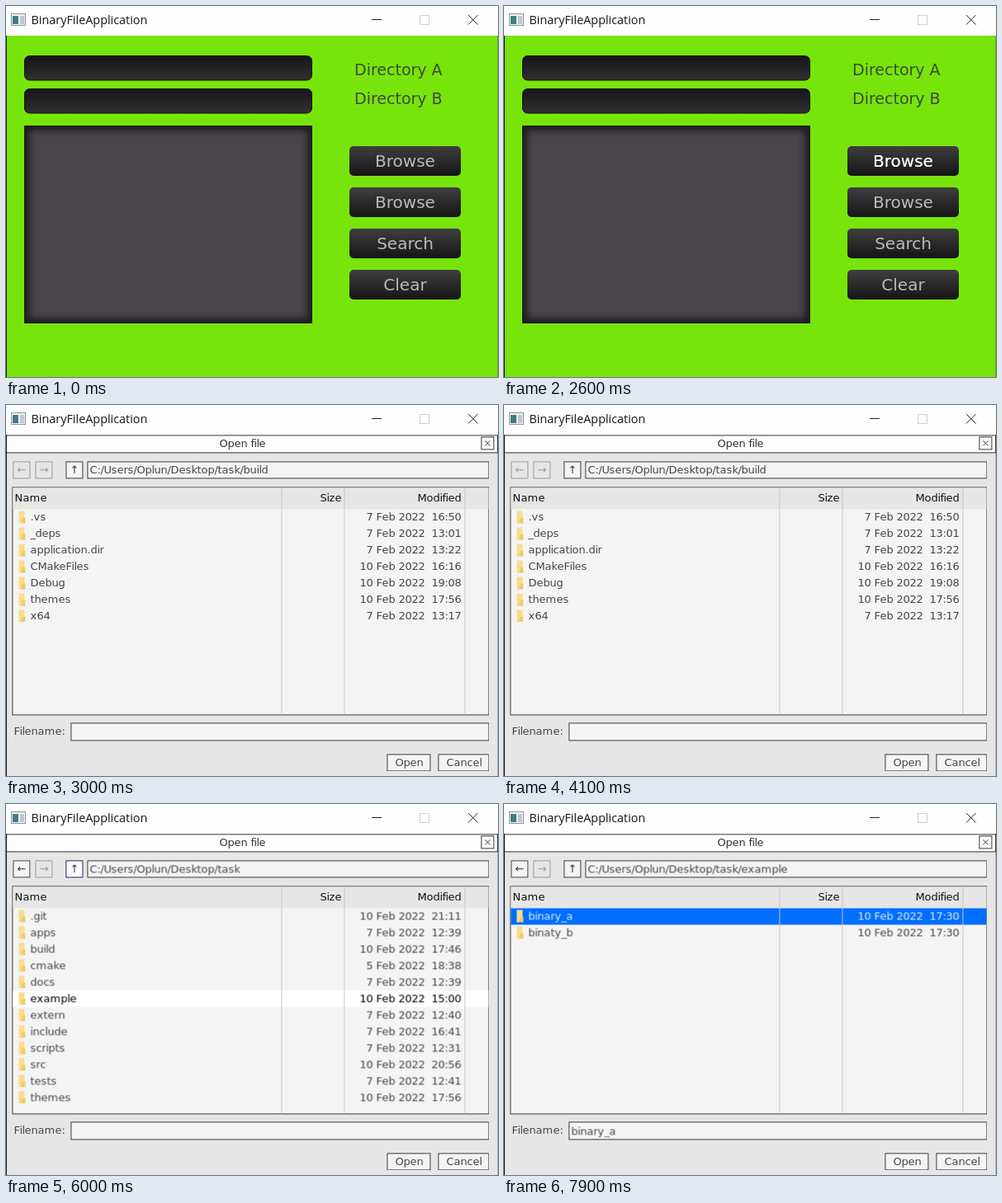
Animation of 596 by 450 pixels, one loop 8000 ms. Source, as an HTML page:

```html
<!DOCTYPE html>
<html lang="en">
<head>
<meta charset="utf-8">
<title>BinaryFileApplication</title>
<style>
html, body { margin: 0; width: 100%; height: 100%; overflow: hidden; background: #fff; }
svg { display: block; }
text { font-family: "DejaVu Sans", sans-serif; white-space: pre; }
.caption { font-family: "Open Sans", "Noto Sans", sans-serif; }
</style>
</head>
<body>
<svg id="stage" width="596" height="450" viewBox="0 0 596 450">
  <defs>
    <linearGradient id="button" x2="0" y2="1">
      <stop offset="0" stop-color="#3f3e40"/><stop offset="1" stop-color="#151516"/>
    </linearGradient>
    <linearGradient id="field" x2="0" y2="1">
      <stop offset="0" stop-color="#161617"/><stop offset="1" stop-color="#302f31"/>
    </linearGradient>
    <filter id="soft"><feGaussianBlur stdDeviation="4"/></filter>
  </defs>
</svg>
<script>
const LOOP = 8000;
const INK = '#464646', LINE = '#3a3a3a', PAPER = '#f4f4f4', PANEL = '#e6e6e6';
const stage = document.getElementById('stage');
const ruler = document.createElement('canvas').getContext('2d');
ruler.font = '1000px "DejaVu Sans", sans-serif';

function add(parent, tag, attrs = {}, content) {
  const el = document.createElementNS('http://www.w3.org/2000/svg', tag);
  for (const key in attrs) el.setAttribute(key, attrs[key]);
  if (content !== undefined) el.textContent = content;
  parent.appendChild(el);
  return el;
}
const group = (parent, attrs) => add(parent, 'g', attrs);
const fillBox = (parent, x, y, width, height, fill) =>
  add(parent, 'rect', { x, y, width, height, fill });
const frameBox = (parent, x, y, width, height, stroke = LINE, fill = PAPER) =>
  add(parent, 'rect', { x: x + .5, y: y + .5, width: width - 1, height: height - 1, stroke, fill });
const path = (parent, d, stroke, fill = 'none') => add(parent, 'path', { d, stroke, fill });

// Small text advances by whole pixels, like hinted glyphs.
const advance = char => Math.floor(ruler.measureText(char).width * .013 + .35);

function label(parent, content, x, y, fill = INK, align = 0) {
  const widths = [...content].map(advance);
  let pen = Math.round(x - align * widths.reduce((a, b) => a + b, 0));
  const xs = widths.map(w => (pen += w) - w);
  return add(parent, 'text', { x: xs.join(' '), y, fill, 'font-size': 13 }, content);
}

// steps: [time, opacity] pairs, each held until the next one.
function schedule(el, steps) {
  const frames = steps.map(([time, opacity]) => ({ offset: time / LOOP, opacity, easing: 'steps(1, end)' }));
  frames.push({ offset: 1, opacity: steps[steps.length - 1][1] });
  el.animate(frames, { duration: LOOP, iterations: Infinity });
}
function during(el, from, to = LOOP) {
  const steps = [[0, 0], [from, 1]];
  if (to < LOOP) steps.push([to, 0]);
  schedule(el, steps);
  return el;
}

function drawCaption() {
  fillBox(stage, 0, 0, 596, 36, '#fefefe');
  frameBox(stage, 6, 9, 18, 15, '#8d9499', '#f2f3f3');
  fillBox(stage, 8, 12, 7, 10, '#3d7f83');
  fillBox(stage, 17, 12, 5, 10, '#c3c8ca');
  add(stage, 'text', { x: 30.5, y: 22.4, class: 'caption', 'font-size': 14.4, fill: '#161616' }, 'BinaryFileApplication');
  path(stage, 'M443 16.5h12', '#222');
  frameBox(stage, 501, 11, 12, 12, '#d0d0d0', 'none');
  path(stage, 'M560 11l11.500 11.500M571.500 11l-11.500 11.500', '#222');
}

function drawMainWindow() {
  fillBox(stage, 0, 36, 596, 414, '#77e50b');
  for (const y of [60, 100]) {
    add(stage, 'rect', { x: 22.5, y: y + .5, width: 348, height: 29.5, rx: 6, fill: 'url(#field)', stroke: '#121213' });
  }
  const area = add(stage, 'svg', { x: 22, y: 145, width: 349, height: 240 });
  fillBox(area, 0, 0, 349, 240, '#1b1a1b');
  fillBox(area, 6, 6, 337, 228, '#484548').setAttribute('filter', 'url(#soft)');
  frameBox(area, 0, 0, 349, 240, '#1d1c1d', 'none');

  const bigText = (content, attrs) => add(stage, 'text', attrs, content);
  bigText('Directory A', { x: 422, y: 83.5, 'font-size': 19, fill: '#3f4a37' });
  bigText('Directory B', { x: 422, y: 118.5, 'font-size': 19, fill: '#3f4a37' });

  ['Browse', 'Browse', 'Search', 'Clear'].forEach((name, i) => {
    const y = 170 + i * 50;
    const caption = { x: 483.5, y: y + 25, 'font-size': 20, 'text-anchor': 'middle', fill: '#bababa' };
    add(stage, 'rect', { x: 416, y, width: 135, height: 36, rx: 5, fill: 'url(#button)' });
    bigText(name, caption);
    if (i === 0) during(bigText(name, { ...caption, fill: '#fff' }), 1800);
  });
}

function toolButton(parent, x, arrow, color, fill = PAPER, ink = color) {
  frameBox(parent, x, 68, 21, 21, color, fill);
  add(parent, 'text', { x: x + 10.5, y: 83, 'font-size': 13, 'text-anchor': 'middle', fill: ink }, arrow);
}

function listRow(parent, index, name, date, ink = INK, back) {
  const y = 126 + index * 20;
  if (back) fillBox(parent, 8, y, 576, 20, back);
  path(parent, `M15 ${y + 2}h7v9l1 6h-8z`, 'none', '#f8dd8c');
  path(parent, `M19 ${y + 11}l4 -1v7h-5z`, 'none', '#efca68');
  label(parent, name, 29, y + 14, ink);
  label(parent, date, 551, y + 14, ink, 1);
}

const folders = [
  { from: 2900, to: 4900, path: '/build', files: [
    ['.vs', '7 Feb 2022  16:50'], ['_deps', '7 Feb 2022  13:01'], ['application.dir', '7 Feb 2022  13:22'],
    ['CMakeFiles', '10 Feb 2022  16:16'], ['Debug', '10 Feb 2022  19:08'],
    ['themes', '10 Feb 2022  17:56'], ['x64', '7 Feb 2022  13:17']
  ], marks: [] },
  { from: 4900, to: 6300, path: '', files: [
    ['.git', '10 Feb 2022  21:11'], ['apps', '7 Feb 2022  12:39'], ['build', '10 Feb 2022  17:46'],
    ['cmake', '5 Feb 2022  18:38'], ['docs', '7 Feb 2022  12:39'], ['example', '10 Feb 2022  15:00'],
    ['extern', '7 Feb 2022  12:40'], ['include', '7 Feb 2022  16:41'], ['scripts', '7 Feb 2022  12:31'],
    ['src', '10 Feb 2022  20:56'], ['tests', '7 Feb 2022  12:41'], ['themes', '10 Feb 2022  17:56']
  ], marks: [
    { row: 2, from: 5600, to: 5700 }, { row: 5, from: 5700, to: 6200 },
    { row: 5, from: 6200, to: 6300, chosen: true }
  ] },
  { from: 6300, to: LOOP, path: '/example', files: [
    ['binary_a', '10 Feb 2022  17:30'], ['binaty_b', '10 Feb 2022  17:30']
  ], marks: [
    { row: 1, from: 6600, to: 6700 }, { row: 0, from: 6700, to: 7300 },
    { row: 0, from: 7300, to: LOOP, chosen: true }
  ] }
];

function drawFolder(parent, folder) {
  const view = during(group(parent), folder.from, folder.to);
  label(view, 'C:/Users/Oplun/Desktop/task' + folder.path, 101, 83);
  folder.files.forEach(([name, date], i) => listRow(view, i, name, date));
  for (const { row, from, to, chosen } of folder.marks) {
    const mark = during(group(view), from, to);
    const [name, date] = folder.files[row];
    listRow(mark, row, name, date, chosen ? '#e4efff' : '#000', chosen ? '#006eff' : '#fff');
    if (chosen) label(mark, name, 81, 401);
  }
}

function drawDialog() {
  const dialog = group(stage);
  fillBox(dialog, 0, 36, 596, 414, PANEL);
  // The controls sit between whole pixels, which softens their lines.
  const body = group(dialog, { transform: 'translate(.4 .4)' });
  fillBox(body, -1, 36, 598, 21, '#fdfdfd');
  path(body, 'M-1 36.500H597M-1 57.500H597', LINE);
  path(dialog, 'M595.500 36V58', LINE);
  label(body, 'Open file', 286, 51, '#333', .5);
  frameBox(body, 575, 38, 16, 16, LINE, '#fafafa');
  path(body, 'M580 43l6 6M586 43l-6 6', LINE);

  toolButton(body, 8, '←', '#999', PANEL);
  toolButton(during(group(body), 4900), 8, '←', LINE);
  toolButton(body, 35, '→', '#999', PANEL);
  toolButton(body, 72, '↑', LINE);
  toolButton(during(group(body), 4400, 4900), 72, '↑', LINE, '#fff', '#000');
  toolButton(during(group(body), 4900, 6200), 72, '↑', '#3a3a96', '#fafaff', LINE);

  frameBox(body, 98, 68, 487, 21);
  frameBox(body, 7, 99, 578, 277);
  fillBox(body, 8, 100, 576, 26, PANEL);
  label(body, 'Name', 10, 117, '#111');
  label(body, 'Size', 406, 117, '#111', 1);
  label(body, 'Modified', 551, 117, '#111', 1);

  label(body, 'Filename:', 9, 400);
  frameBox(body, 78, 385, 507, 22);
  frameBox(body, 461, 423, 53, 21);
  label(body, 'Open', 487.5, 438, INK, .5);
  frameBox(body, 523, 423, 62, 21);
  label(body, 'Cancel', 554, 438, INK, .5);

  folders.forEach(folder => drawFolder(body, folder));
  path(body, 'M333.500 100V375M409.500 100V375M555.500 100V375', '#c6c6c6');
  schedule(dialog, [[0, 0], [2900, .09], [3000, 1]]);
}

drawCaption();
drawMainWindow();
drawDialog();
fillBox(stage, 0, 36, 1, 414, '#1c1c1c');
fillBox(stage, 595, 36, 1, 414, 'rgba(60, 60, 60, .3)');
</script>
</body>
</html>
```
